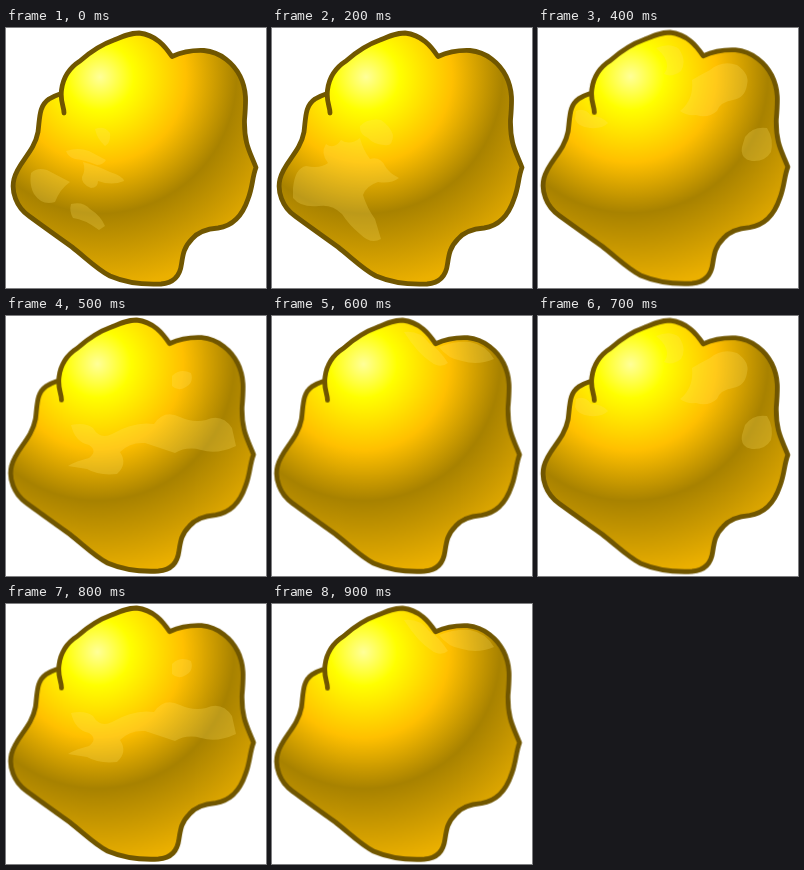
These frames come from a looping animation (260 by 260 pixels, 1000 ms). An HTML page:

```html
<!DOCTYPE html>
<html lang="en">
<head>
<meta charset="utf-8">
<title>Gold nugget</title>
<style>
  html, body { margin: 0; width: 100%; height: 100%; overflow: hidden; background: #fff; }
  svg { display: block; width: 100vw; height: 100vh; }
  .nugget { animation: wobble 1s step-end infinite; }
  .shine { fill: #ffe56a; fill-opacity: .24; opacity: 0; animation: 1s step-end infinite; }
  .low { animation-name: low; }
  .sweep { animation-name: sweep; }
  .side { animation-name: side; }
  .band { animation-name: band; }
  .rim { animation-name: rim; }

  @keyframes wobble {
    0% { transform: none; }
    40%, 70% { transform: translate(-2.2px, -.6px) scale(1.008, 1); }
    50%, 80% { transform: translate(-2.5px, -1px); }
    60%, 90% { transform: translate(-2.5px, -.8px); }
  }
  @keyframes low { 0% { opacity: 1; } 20%, 100% { opacity: 0; } }
  @keyframes sweep { 0% { opacity: 0; } 20% { opacity: 1; } 40%, 100% { opacity: 0; } }
  @keyframes side { 0%, 50%, 80%, 100% { opacity: 0; } 40%, 70% { opacity: 1; } }
  @keyframes band { 0%, 60%, 90%, 100% { opacity: 0; } 50%, 80% { opacity: 1; } }
  @keyframes rim { 0%, 70%, 100% { opacity: 0; } 60%, 90% { opacity: 1; } }
</style>
</head>
<body>
<svg viewBox="0 0 260 260">
  <defs>
    <radialGradient id="gold" gradientUnits="userSpaceOnUse" cx="94" cy="49" r="210">
      <stop offset="0" stop-color="#ffff99"/>
      <stop offset=".16" stop-color="#ffff00"/>
      <stop offset=".41" stop-color="#ffc000"/>
      <stop offset=".65" stop-color="#a88200"/>
      <stop offset="1" stop-color="#ebb000"/>
    </radialGradient>
  </defs>

  <g class="nugget">
    <path fill="url(#gold)" stroke="#705600" stroke-width="4.8" stroke-linecap="round" stroke-linejoin="round"
      d="M58 85C58 78 54 74 55.500 62C57 50 63 40 74 33C83 25 94 17 108 12
         C117 8 124 5 133 5C150 7 159 18 166 28.500C176 24 187 22 198 22.500
         C215 24 228 36 234 48C241 62 240 74 238.500 92C238 116 244 124 250 139.500
         C246 150 247 158 242 171C236 189 226 198 212 200C199 201 191 205 186 211
         C178 219 177 226 175.500 236C174 248 168 255 155 256C135 257 118 254 104 248
         C92 242 80 230 66 219C52 209 38 199 23 188C10 179 5 163 8 151
         C12 134 28 125 32 104C34 88 33 78 43 71C48 68 51 67 54 66"/>
  </g>

  <g class="shine low">
    <path d="M25 145Q31 139 41 142L64 154Q54 161 49 174Q36 178 28 166Q23 157 25 145Z"/>
    <path d="M60 123Q72 119 83 123L100 132Q97 137 91 137Q79 132 69 131Q62 129 60 123Z"/>
    <path d="M77 134Q92 138 104 144Q117 148 118 153Q106 158 92 153Q92 160 85 160Q75 156 76 149Q80 142 77 134Z"/>
    <path d="M89 101Q98 97 104 105Q105 115 99 118Q91 111 89 101Z"/>
    <path d="M65 176Q77 173 84 181Q95 188 99 198L93 202Q78 191 67 190Q63 183 65 176Z"/>
  </g>

  <g class="shine sweep">
    <path d="M21 160Q23 140 34 138Q48 141 56 135Q48 125 54 116Q62 122 69 112
             Q78 118 88 110Q91 122 98 131Q108 128 113 138Q117 145 127 150
             Q119 156 106 154Q94 158 91 167Q95 180 103 191L109 211
             Q99 217 88 206Q77 197 70 186Q60 176 47 178Q29 180 21 170Z"/>
    <path d="M88 98Q96 90 109 92Q118 98 121 107Q121 119 112 117Q101 116 96 110Q87 106 88 98Z"/>
  </g>

  <g class="shine side">
    <path d="M142 83Q156 72 154 52Q164 46 172 42Q184 32 199 37Q212 46 209 57
             Q207 70 195 72Q182 74 179 83Q170 91 158 87Q148 88 142 83Z"/>
    <path d="M207 109Q215 98 229 100Q236 111 233 124Q227 134 214 133Q202 131 204 119Z"/>
    <path d="M118 20Q132 14 141 21Q149 33 143 43Q134 50 126 46Q135 34 118 20Z"/>
    <path d="M38 83Q47 79 53 88Q64 88 70 95Q65 101 52 100Q40 99 37 91Z"/>
  </g>

  <g class="shine band">
    <path d="M65 109Q79 106 87 112Q94 124 106 118Q128 105 148 108Q158 93 174 101
             Q187 107 200 104Q216 97 226 112L230 130Q211 139 195 134
             Q181 130 169 137Q151 131 139 127Q124 126 114 136
             Q122 148 111 158Q93 160 81 153L62 150Q70 145 83 142
             Q92 135 83 129Q69 126 65 109Z"/>
    <path d="M166 60Q174 52 185 57Q188 67 180 71Q172 76 166 70Z"/>
  </g>

  <g class="shine rim">
    <path d="M132 16Q148 14 157 27Q167 33 176 47Q168 53 159 46Q146 38 132 16Z"/>
    <path d="M167 31Q182 25 198 26Q214 29 222 43Q206 50 190 45Q176 43 167 31Z"/>
  </g>
</svg>
</body>
</html>
```
